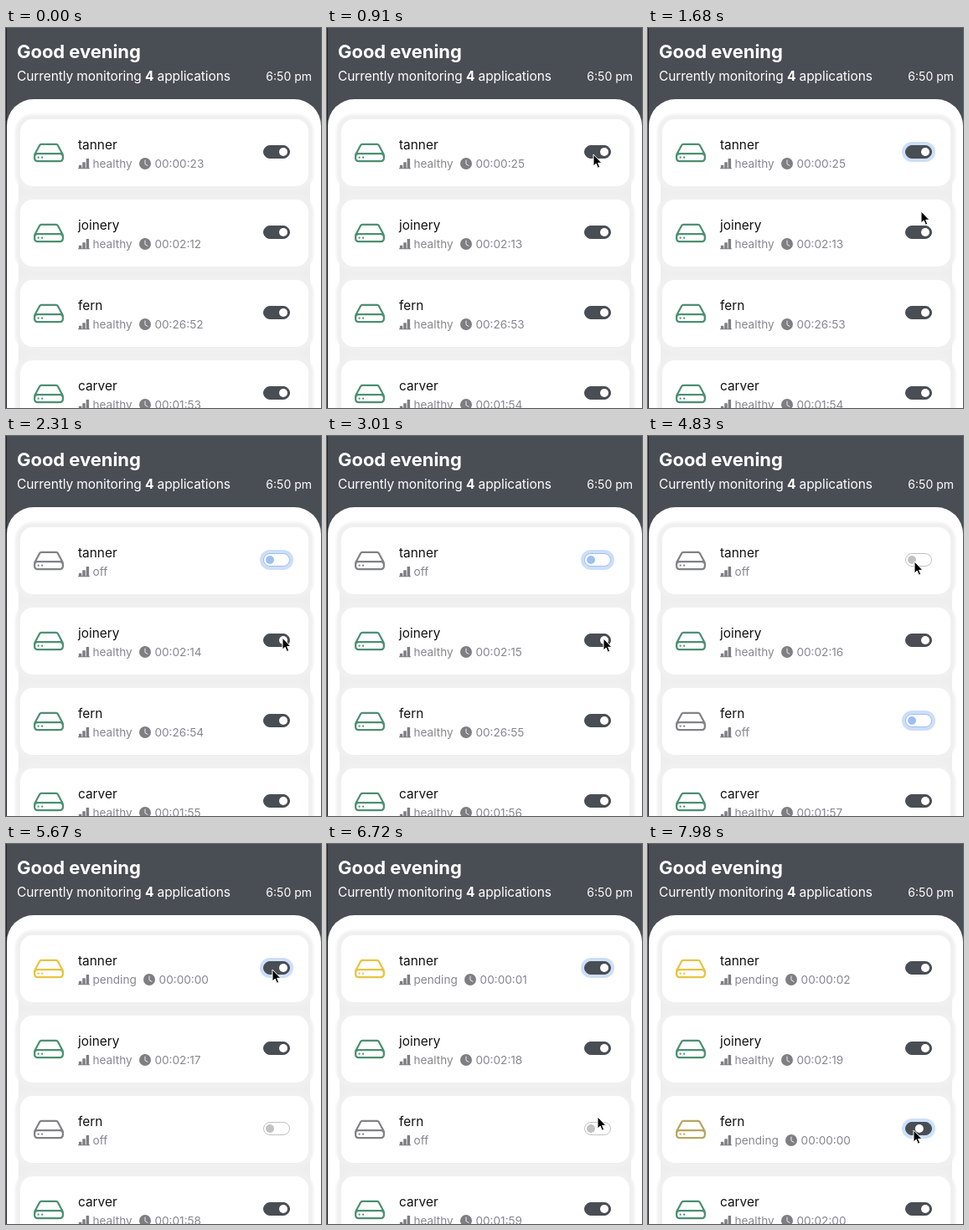
Write an HTML page that moves like this. It is 376x454 px and loops after 8000 ms.

```html
<!DOCTYPE html>
<html lang="en">
<head>
<meta charset="utf-8">
<title>Application monitor</title>
<style>
  html, body { margin: 0; width: 100%; height: 100%; overflow: hidden; }
  body { position: relative; background: #494d54; font-family: Inter, "Open Sans", sans-serif; }
  body > *, .card > * { position: absolute; white-space: nowrap; }
  h1 { margin: 0; left: 13px; top: 15px; font: 700 22px/26px Inter, sans-serif; letter-spacing: -.05px; color: #fff; }
  .sub { left: 13px; top: 48px; font-size: 15.5px; line-height: 20px; letter-spacing: -.1px; color: #fff; }
  .time { right: 11px; top: 48px; font-size: 14px; line-height: 20px; color: #fff; }
  .panel { left: 1px; right: 0; top: 84.5px; bottom: 0; background: #fff; border-radius: 32px 32px 0 0; }
  .edge { left: 0; top: 0; width: 1px; height: 100%; background: #222428; }
  .gaps { left: 15px; width: 348px; top: 120px; bottom: 0; background: #eee; }
  .card { left: 17px; width: 344px; height: 80px; background: #fff; border-radius: 15px; box-shadow: 0 0 3px 6px #f0f0f0; }
  .disk { left: 16px; top: 22px; width: 36px; height: 36px; fill: none; stroke: currentColor; }
  .disk circle { fill: currentColor; stroke: none; }
  .name { left: 69px; top: 21.2px; font-size: 15.4px; line-height: 20px; color: #111; }
  .status { left: 69px; top: 43px; display: flex; align-items: center; font-size: 13.6px; line-height: 20px; color: #85878a; }
  .status svg { width: 14px; height: 14px; fill: #7d7f83; }
  .label { margin: 0 8px 0 3.5px; }
  .age { display: flex; align-items: center; }
  .age svg { margin-right: 4.8px; }
  .switch { left: 290px; top: 31px; width: 32px; height: 16px; border-radius: 8px; box-sizing: border-box; border: 1px solid; }
  .knob { position: absolute; top: 1.75px; left: 1.75px; width: 10.5px; height: 10.5px; border-radius: 50%; }
  #cursor { left: -1.4px; top: -1.3px; width: 14px; height: 21px; }
</style>
</head>
<body>
<h1>Good evening</h1>
<div class="sub">Currently monitoring <b>4</b> applications</div>
<div class="time">6:50 pm</div>
<div class="panel"></div>
<div class="edge"></div>
<div class="gaps"></div>
<template id="row">
  <div class="card">
    <svg class="disk" viewBox="0 0 16 16">
      <path d="M4.1 3.5H11.9A1 1 0 0 1 12.8 4L15.25 8.55Q15.5 9 15.5 9.5V11A1.5 1.5 0 0 1 14 12.5H2A1.5 1.5 0 0 1 .5 11V9.5Q.5 9 .75 8.55L3.2 4A1 1 0 0 1 4.1 3.5ZM.5 10A1.5 1.5 0 0 1 2 8.5H14A1.5 1.5 0 0 1 15.5 10"/>
      <circle cx="2.5" cy="10.5" r=".5"/><circle cx="4.5" cy="10.5" r=".5"/>
    </svg>
    <div class="name"></div>
    <div class="status">
      <svg viewBox="0 0 16 16"><path d="M1 10.5L1.5 10H4.5L5 10.5V14H6V6.5L6.5 6H9.5L10 6.5V14H11V1.5L11.5 1H14.5L15 1.5V14H16V15H0V14H1Z"/></svg>
      <span class="label"></span>
      <span class="age">
        <svg viewBox="0 0 16 16"><circle cx="8" cy="8" r="8"/><path d="M8 3.5V8.7L11.5 10.7" fill="none" stroke="#fff" stroke-linecap="round"/></svg>
        <span class="clock"></span>
      </span>
    </div>
    <div class="switch"><div class="knob"></div></div>
  </div>
</template>
<svg id="cursor" viewBox="-2 -2 14 21">
  <path d="M0 0V14L3.2 11.1L5.3 16.2L7.7 15.2L5.6 10.3H9.9Z" stroke="#fff" stroke-width="1"/>
</svg>
<script>
const LOOP = 8000, STEP = 70, FADE = 150, TICK = 1035, FIRST_TICK = 900;
const TINT = { healthy: [76, 143, 114], off: [128, 130, 134], pending: [230, 196, 66] };
const DARK = '#494d54';

// states: [time, status]; age: seconds shown at the start
const apps = [
  { name: 'tanner', age: 23.98, rate: 1.035, states: [[-999, 'healthy'], [1935, 'off'], [5310, 'pending']] },
  { name: 'joinery', age: 132, rate: 1, states: [[-999, 'healthy']] },
  { name: 'fern', age: 1612, rate: 1, states: [[-999, 'healthy'], [3880, 'off'], [7900, 'pending']] },
  { name: 'carver', age: 113, rate: 1, states: [[-999, 'healthy']] }
];
// which row holds focus from a given time
const focus = [[-999, -1], [1100, 0], [3780, 2], [5200, 0], [7840, 2]];
// pointer path: time, x, y
const path = [
  [70, 374, 270], [560, 317, 150], [1080, 317, 150], [1680, 325, 218], [2030, 329, 240],
  [3010, 329, 241], [3150, 329, 248], [3220, 329, 248], [3570, 329, 341], [3920, 329, 341],
  [4410, 317, 150], [4830, 317, 149], [6020, 317, 149], [6720, 322, 325], [7000, 316, 340], [7980, 316, 341]
];

const cursor = document.getElementById('cursor');
const template = document.getElementById('row').content;
const clamp = v => Math.max(0, Math.min(1, v));
const ease = v => v * v * (3 - 2 * v);
const mix = (a, b, k) => a + (b - a) * k;
const pad = n => String(n).padStart(2, '0');
const clock = s => [s / 3600, s / 60 % 60, s % 60].map(v => pad(Math.floor(v))).join(':');
const ticksAt = t => t < FIRST_TICK ? 0 : 1 + Math.floor((t - FIRST_TICK) / TICK);

// current entry, the one before it and the eased progress between them
function phase(list, t) {
  let i = list.length - 1;
  while (i > 0 && list[i][0] > t) i--;
  const [start, now] = list[i];
  return { start, now, before: list[Math.max(0, i - 1)][1], k: ease(clamp((t - start) / FADE)) };
}

apps.forEach((app, i) => {
  const card = template.firstElementChild.cloneNode(true);
  card.style.top = 109 + 96 * i + 'px';
  document.body.insertBefore(card, cursor);
  for (const part of ['disk', 'name', 'label', 'age', 'clock', 'switch', 'knob'])
    app[part + 'El'] = card.querySelector('.' + part);
  app.nameEl.textContent = app.name;
});

function drawApp(app, i, t) {
  const s = phase(app.states, t), f = phase(focus, t);
  const on = s.now !== 'off', wasOn = s.before !== 'off', focused = f.now === i;
  const tint = TINT[s.before].map((c, n) => Math.round(mix(c, TINT[s.now][n], s.k)));
  app.diskEl.style.color = `rgb(${tint})`;
  app.labelEl.textContent = s.now;
  app.ageEl.style.visibility = on ? 'visible' : 'hidden';
  const age = s.now === 'pending'
    ? ticksAt(t) - ticksAt(s.start)
    : Math.floor(app.age + ticksAt(t) * app.rate);
  app.clockEl.textContent = clock(age);

  const offTone = focused ? '#9cbff5' : '#c2c2c2';
  const ring = focused ? f.k : f.before === i ? 1 - f.k : 0;
  const box = app.switchEl.style, knob = app.knobEl.style;
  box.background = on ? DARK : '#fff';
  box.borderColor = on ? DARK : offTone;
  box.boxShadow = `0 0 0 4px rgba(40, 115, 230, ${.23 * ring})`;
  knob.background = on ? '#fff' : offTone;
  knob.transform = `translateX(${mix(wasOn ? 16 : 0, on ? 16 : 0, s.k)}px)`;
}

function drawCursor(t) {
  cursor.style.visibility = t < path[0][0] ? 'hidden' : 'visible';
  let i = 0;
  while (i < path.length - 2 && path[i + 1][0] <= t) i++;
  const [t0, x0, y0] = path[i], [t1, x1, y1] = path[i + 1];
  const k = ease(clamp((t - t0) / (t1 - t0)));
  cursor.style.transform = `translate(${mix(x0, x1, k)}px, ${mix(y0, y1, k)}px)`;
}

const begin = performance.now();
function frame() {
  const t = Math.floor((performance.now() - begin) % LOOP / STEP) * STEP;
  apps.forEach((app, i) => drawApp(app, i, t));
  drawCursor(t);
  requestAnimationFrame(frame);
}
frame();
</script>
</body>
</html>
```
